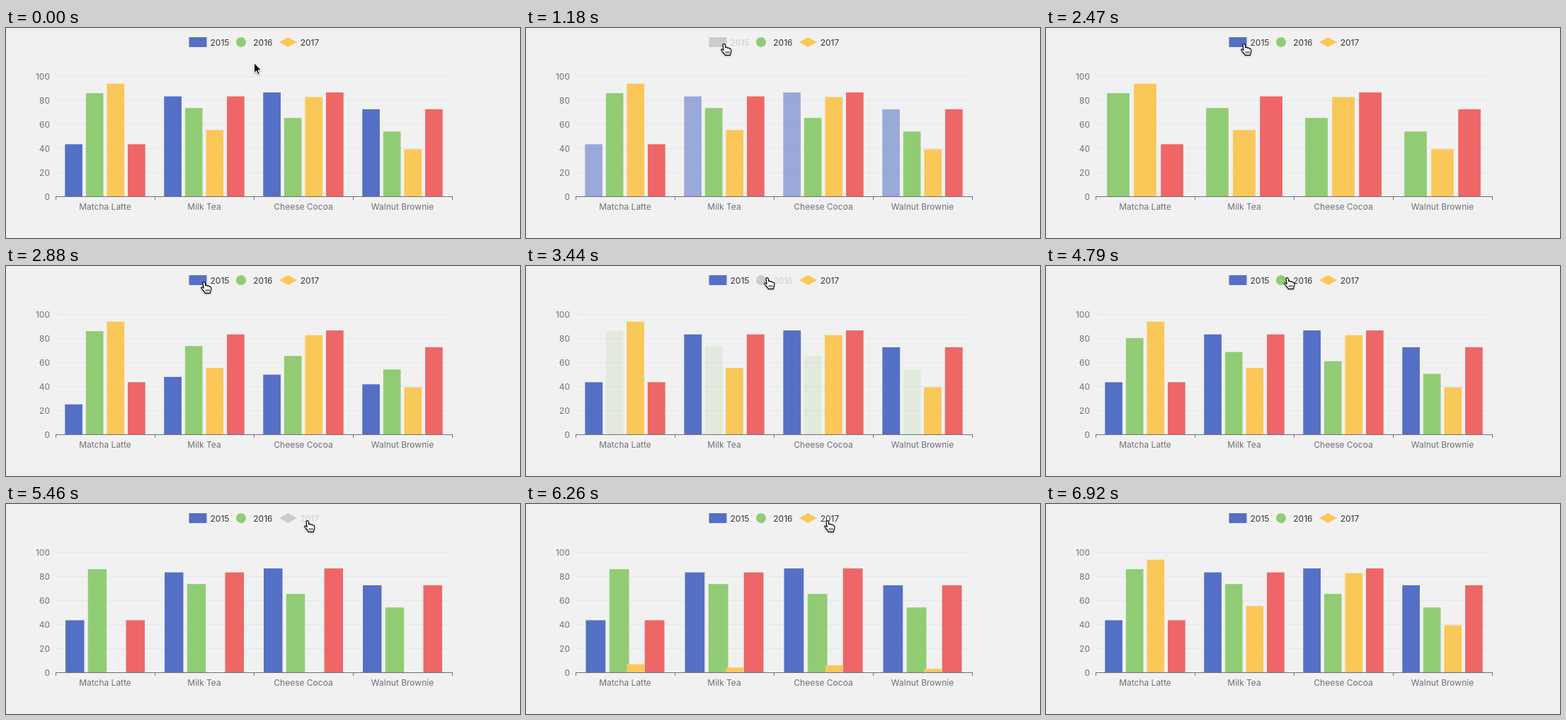
Animation, 726 px wide and 297 px high, one loop 7.58 s. Source, as an HTML page:

```html
<!DOCTYPE html>
<html lang="en">
<head>
<meta charset="utf-8">
<title>Bar chart with legend toggles</title>
<style>
  html, body { margin: 0; width: 100%; height: 100%; overflow: hidden; background: #f1f1f1; }
  svg { display: block; width: 726px; height: 297px; }
  text { font: 12px Inter, "Noto Sans", sans-serif; fill: #6e7079; }
  .legend text { fill: #333; }
  .cursor { filter: drop-shadow(0 1px 1px rgba(0, 0, 0, .35)); }
</style>
</head>
<body>
<svg id="stage" viewBox="0 0 726 297"></svg>
<script>
const LOOP = 7580;
const LEFT = 70, BASE = 238, BAND = 140, UNIT = 1.7;
const OFF = '#ccc';
const labels = ['Matcha Latte', 'Milk Tea', 'Cheese Cocoa', 'Walnut Brownie'];
const first = [43.3, 83.1, 86.4, 72.4];
const series = [
  { color: '#5470c6', data: first },
  { color: '#91cc75', data: [85.8, 73.4, 65.2, 53.9] },
  { color: '#fac858', data: [93.7, 55.1, 82.5, 39.1] },
  { color: '#ee6666', data: first }
];
// Legend clicks; hold is how long the first step of the response stays
const toggles = [
  { at: 1180, id: 0, on: false, hold: 50 },
  { at: 2470, id: 0, on: true, hold: 80 },
  { at: 3385, id: 1, on: false, hold: 45 },
  { at: 4210, id: 1, on: true, hold: 90 },
  { at: 5280, id: 2, on: false, hold: 90 },
  { at: 6040, id: 2, on: true, hold: 85 }
];
// Pointer path: from, until, target x, target y
const start = [350.5, 49.5];
const moves = [
  [120, 850, 280, 22],
  [3250, 3380, 341, 16],
  [4980, 5140, 426, 23],
  [6450, 6920, 726, 235]
];
const hotspots = [[258, 315], [325, 376], [386, 441]];

const stage = document.getElementById('stage');
const clamp = v => Math.min(1, Math.max(0, v));
const mix = (a, b, p) => a + (b - a) * p;
const ease = v => {
  const p = clamp(v);
  return p < .5 ? 4 * p ** 3 : 1 - 4 * (1 - p) ** 3;
};

function set(el, attrs) {
  for (const key in attrs) el.setAttribute(key, attrs[key]);
  return el;
}
function add(parent, tag, attrs = {}, text = '') {
  const el = document.createElementNS('http://www.w3.org/2000/svg', tag);
  if (text) el.textContent = text;
  return parent.appendChild(set(el, attrs));
}

// Grid and value labels
for (let v = 0; v <= 100; v += 20) {
  const y = BASE - v * UNIT;
  if (v) add(stage, 'path', { d: `M70 ${y + .5}H630`, stroke: '#e0e6f1' });
  add(stage, 'text', { x: 62, y: y + 4.6, 'text-anchor': 'end' }, String(v));
}

// Category axis
let axis = `M70 ${BASE + .5}H631`;
for (let i = 0; i <= 4; i++) axis += `M${LEFT + i * BAND + .5} ${BASE}v5`;
add(stage, 'path', { d: axis, stroke: '#6e7079', fill: 'none' });
labels.forEach((name, i) =>
  add(stage, 'text', { x: LEFT + (i + .5) * BAND, y: 256.7, 'text-anchor': 'middle' }, name));

const bars = series.map(s => {
  const group = add(stage, 'g', { fill: s.color });
  return { group, rects: s.data.map(() => add(group, 'rect')) };
});

// Legend
const legend = add(stage, 'g', { class: 'legend' });
const marks = [
  add(legend, 'rect', { x: 258.5, y: 13, width: 25, height: 14 }),
  add(legend, 'circle', { cx: 332, cy: 20, r: 7 }),
  add(legend, 'path', { d: 'M386 20L398.5 13L411 20L398.5 27Z' })
];
const names = [288.5, 349.3, 415.7].map((x, i) =>
  add(legend, 'text', { x, y: 24.5 }, String(2015 + i)));

// Pointer shapes, both with the hot point at 0,0
const cursor = add(stage, 'g', { class: 'cursor' });
const arrow = add(cursor, 'path', {
  d: 'M0 0V14L3.2 11L5.4 16.2L7.7 15.2L5.5 10.2H10Z', fill: '#000', stroke: '#fff'
});
const hand = add(cursor, 'g', {
  transform: 'translate(-5 0)', fill: '#fff', stroke: '#000', 'stroke-width': 1.1, 'stroke-linejoin': 'round'
});
add(hand, 'path', {
  d: 'M3 2Q3 .6 4.6 .6Q6 .6 6.2 2L6.8 6Q7.2 5 8.4 5.2Q9.6 5.4 9.8 6.6Q10.4 5.8 11.4 6.1' +
     'Q12.4 6.4 12.6 7.4Q14.6 7 14.8 9Q15 12 13.8 14L13.4 16.4H6.4Q5 14 3 12L1 9.6' +
     'Q.2 8.2 1.4 7.8Q2.6 7.6 4.2 9.6Z'
});
add(hand, 'path', { d: 'M7.6 11v3M9.7 11v3M11.8 11v3', 'stroke-width': .9 });

// Offset and width of each shown series within a category band
function layout(shown) {
  const n = shown.filter(Boolean).length;
  const gap = .35 - n * .04;
  const w = BAND * (1 - gap) / (n + .2 * (n - 1));
  let x = BAND * gap / 2;
  return shown.map(on => {
    const slot = { x, w };
    if (on) x += w * 1.2;
    return slot;
  });
}

function drawBars(t) {
  const shown = series.map(() => true);
  let before = shown.slice(), last = null;
  for (const k of toggles) {
    if (k.at > t) break;
    before = shown.slice();
    shown[k.id] = k.on;
    last = k;
  }
  let age = 2000;
  if (last) {
    const dt = t - last.at;
    age = dt < last.hold ? 36 : 76 + (dt - last.hold) * 1.36;
  }
  const from = layout(before), to = layout(shown);
  const shift = ease(age / 500);

  bars.forEach(({ group, rects }, s) => {
    let { x, w } = to[s], grow = 1, alpha = 1;
    if (last && s === last.id) {
      if (last.on) grow = ease(age / 1000);
      else {
        ({ x, w } = from[s]);
        alpha = (1 - clamp(age / 200)) ** 3;
      }
    } else {
      x = mix(from[s].x, x, shift);
      w = mix(from[s].w, w, shift);
    }
    set(group, { opacity: alpha });
    rects.forEach((r, i) => {
      const h = series[s].data[i] * UNIT * grow;
      set(r, { x: LEFT + i * BAND + x, y: BASE - h, width: w, height: h });
    });
  });
  marks.forEach((m, i) => {
    set(m, { fill: shown[i] ? series[i].color : OFF });
    names[i].style.fill = shown[i] ? '' : OFF;
  });
}

function drawCursor(t) {
  let [x, y] = start;
  for (const [a, b, tx, ty] of moves) {
    const p = ease((t - a) / (b - a));
    x = mix(x, tx, p);
    y = mix(y, ty, p);
  }
  const over = y >= 13 && y <= 27 && hotspots.some(([a, b]) => x >= a && x <= b);
  set(cursor, {
    transform: `translate(${x} ${y})`,
    visibility: t < 6920 ? 'visible' : 'hidden'
  });
  arrow.style.display = over ? 'none' : '';
  hand.style.display = over ? '' : 'none';
}

const t0 = performance.now();
function draw() {
  const t = (performance.now() - t0) % LOOP;
  drawBars(t);
  drawCursor(t);
  requestAnimationFrame(draw);
}
draw();
</script>
</body>
</html>
```
